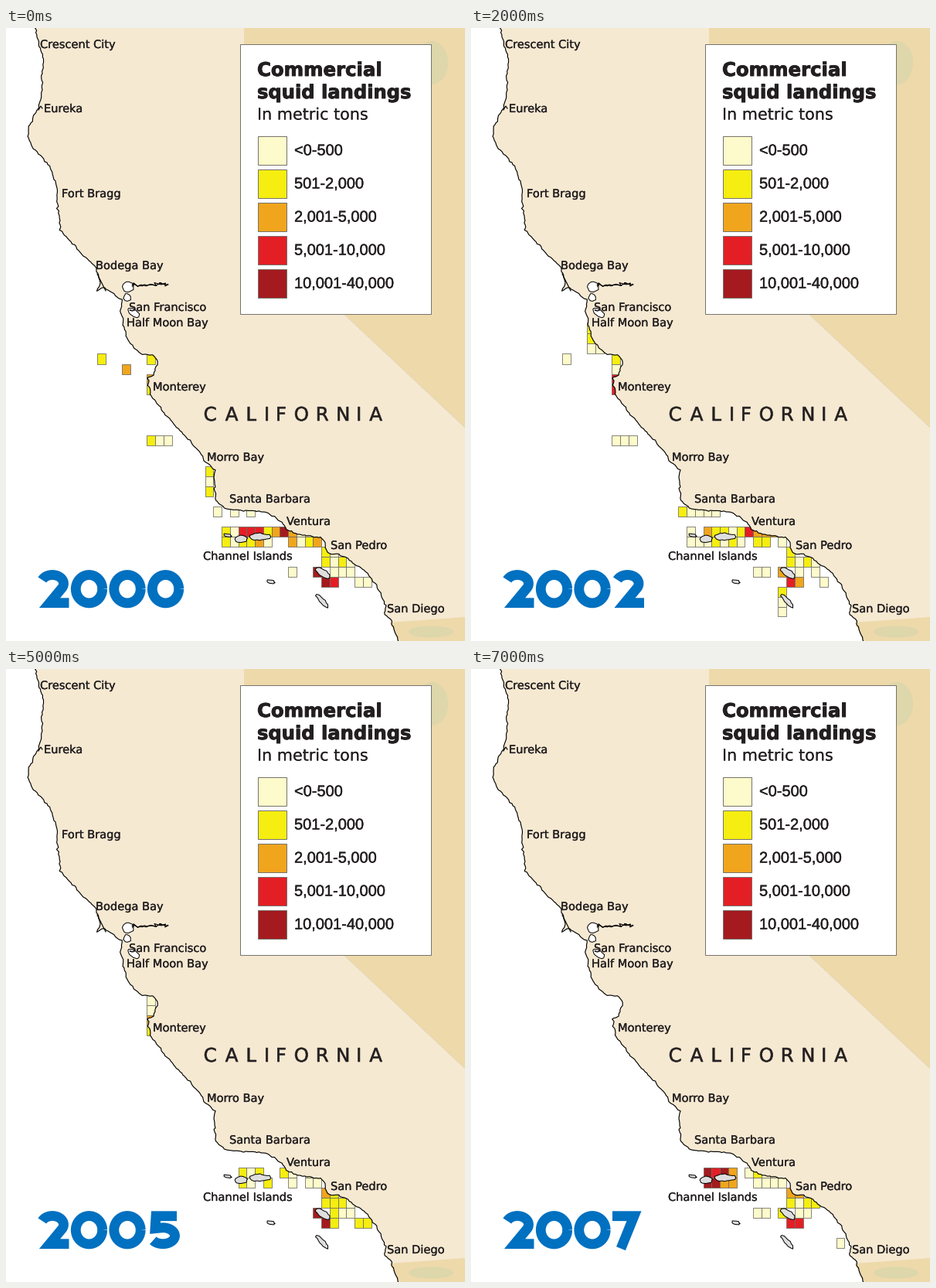
A matplotlib script for the animation above (8000 ms loop, 594x793 px).

```python
import numpy as np
import matplotlib.pyplot as plt
from matplotlib.animation import FuncAnimation
from matplotlib.collections import PatchCollection
from matplotlib.patches import Ellipse, PathPatch, Polygon, Rectangle
from matplotlib.path import Path
from matplotlib.patheffects import withStroke
from matplotlib.textpath import TextPath

W, H = 594, 793
INK, BLUE, GREY = "#231f20", "#0070c0", "#77736c"
LAND, OUTSIDE, GREEN = "#f6e9d2", "#eed9aa", "#ddd7ab"
LEVELS = ["#fdfacb", "#f5ee10", "#f0a51c", "#e41e25", "#a51a1e"]
YEARS = range(2000, 2008)

# one px equals one point
fig = plt.figure(figsize=((W + .001) / 72, (H + .001) / 72), dpi=72, facecolor="white")
ax = fig.add_axes([0, 0, 1, 1])
ax.set(xlim=(0, W), ylim=(H, 0))
ax.axis("off")


def shape(points, z, fill, edge="none", lw=0.0):
    ax.add_patch(Polygon(points, closed=True, facecolor=fill, edgecolor=edge,
                         lw=lw, zorder=z))


def line(points, z, color="black", lw=1.15, **kw):
    ax.plot(*zip(*points), color=color, lw=lw, zorder=z, **kw)


def label(x, y, text, size=14.6, family="DejaVu Sans", weight="normal", bold=.3):
    ax.text(x, y, text, fontsize=size, family=family, weight=weight, color=INK,
            va="baseline", zorder=12,
            path_effects=[withStroke(linewidth=bold, foreground=INK)])


def roughen(points, sigma=.55, step=3, seed=4):
    """Resample a polyline and give it a ragged shore."""
    p = np.array(points, float)
    s = np.r_[0, np.cumsum(np.hypot(*np.diff(p, axis=0).T))]
    t = np.linspace(0, s[-1], int(s[-1] / step))
    q = np.c_[np.interp(t, s, p[:, 0]), np.interp(t, s, p[:, 1])]
    return q + np.random.default_rng(seed).normal(0, sigma, q.shape)


def arc(cx, cy, rx, ry, start, end):
    a = np.radians(np.linspace(start, end, 60))
    return list(zip(cx + rx * np.cos(a), cy + ry * np.sin(a)))


def blob(x, y, w, h, angle, fill):
    """Ragged, tilted ellipse with a black shore."""
    a = np.radians(angle)
    turn = np.array([[np.cos(a), np.sin(a)], [-np.sin(a), np.cos(a)]])
    ring = np.array(arc(0, 0, w / 2, h / 2, 0, 360)) @ turn + [x, y]
    shape(roughen(ring, .5), 6, fill, "black", 1)


# ---- base map ----
shore = [(38, 0), (45, 28), (49, 45), (46, 62), (47, 80), (43, 100), (30, 128),
         (28, 140), (33, 152), (57, 180), (66, 205), (66, 225), (71, 262),
         (93, 287), (116, 309), (122, 331), (117, 340), (126, 335), (150, 352),
         (148, 365), (157, 404), (173, 421), (192, 424), (196, 432), (191, 449),
         (183, 453), (188, 476), (206, 500), (225, 520), (253, 551), (256, 560),
         (270, 571), (269, 585), (272, 612), (284, 622), (335, 626), (358, 640),
         (362, 648), (375, 654), (408, 659), (414, 666), (413, 675), (421, 681),
         (431, 680), (465, 702), (480, 722), (492, 748), (489, 757), (497, 765),
         (508, H)]
coast = roughen(shore)

shape(np.r_[coast, [(W, H), (W, 0)]], 3, LAND)
shape([(308, 0), (W, 0), (W, 517), (308, 249)], 3.1, OUTSIDE)
shape([(497, 769), (W, 762), (W, H), (508, H)], 3.1, OUTSIDE)
ax.add_patch(Ellipse((551, 45), 42, 56, color=GREEN, lw=0, zorder=3.2))
ax.add_patch(Ellipse((550, 781), 58, 15, color=GREEN, lw=0, zorder=3.2))
line([(437, 370), (W, 517)], 3.3, "#c5c3b8", .7, ls=":")
line(coast, 4)

# bay, its eastern arm and the estuaries
for spot in [(158, 335, 14, 13, 0), (157, 348, 9, 11, 0), (165, 368, 18, 8, 40)]:
    blob(*spot, "white")
for seed in (1, 2):
    line(roughen([(163, 333), (182, 333), (209, 331)], 1.3, 2.5, seed), 6)
line([(118, 318), (129, 340)], 5)
line([(42, 106), (45, 101), (47, 104)], 5)

for isle in [(287, 656, 11, 4, 10), (304, 661, 16, 9, 0), (329, 658, 28, 8, 0),
             (410, 705, 22, 8, 36), (409, 741, 24, 5, 50), (343, 716, 11, 5, 10)]:
    blob(*isle, "#dedede")

# ---- labels ----
for x, y, name in [(44, 26, "Crescent City"), (49, 109, "Eureka"),
                   (72, 219, "Fort Bragg"), (116, 312, "Bodega Bay"),
                   (159, 366, "San Francisco"), (156, 386, "Half Moon Bay"),
                   (190, 469, "Monterey"), (260, 560, "Morro Bay"),
                   (289, 614, "Santa Barbara"), (363, 643, "Ventura"),
                   (420, 674, "San Pedro"), (255, 688, "Channel Islands"),
                   (493, 756, "San Diego")]:
    label(x, y, name)

x = 257
for ch in "CALIFORNIA":
    glyph = TextPath((0, 0), ch, size=24.5, prop={"family": "DejaVu Sans"})
    box = glyph.get_extents()
    verts = glyph.vertices * [1, -1] + [x - box.x0, 508]
    ax.add_patch(PathPatch(Path(verts, glyph.codes), facecolor=INK, edgecolor=INK,
                           lw=.6, snap=False, zorder=12))
    x += box.width + 12.5

# ---- legend ----
ax.add_patch(Rectangle((303, 21), 247, 349, facecolor="white", edgecolor=GREY,
                       lw=1, zorder=10))
label(325, 62, "Commercial", 24.4, weight="bold", bold=.9)
label(325, 91, "squid landings", 24.2, weight="bold", bold=.9)
label(325, 118.5, "In metric tons", 20.7, bold=.1)
ranges = ["<0-500", "501-2,000", "2,001-5,000", "5,001-10,000", "10,001-40,000"]
for i, (text, color) in enumerate(zip(ranges, LEVELS)):
    y = 140 + 43 * i
    ax.add_patch(Rectangle((326, y), 37, 37, facecolor=color, edgecolor=GREY,
                           lw=1, zorder=11))
    label(373, y + 24.5, text, 20, "Liberation Sans", bold=.4)

# ---- fishing grounds: column, row, width, height, peak level year by year ----
GROUNDS = [
    (0, -6, 2, 2, "00020000"),   # gulf
    (4, -3, 1, 2, "00230000"),
    (4, -1, 2, 1, "01111000"),
    (1, 0, 1, 1, "22111000"),    # offshore
    (4, 1, 1, 1, "31000000"),
    (7, 0, 1, 2, "22211100"),    # bay
    (7, 2, 1, 2, "34443330"),
    (7, 8, 4, 1, "21111000"),    # central coast
    (14, 11, 1, 3, "20010000"),
    (15, 15, 6, 1, "12222000"),
    (16, 17, 2, 2, "22111000"),  # islands, west to east
    (18, 17, 4, 2, "42334245"),
    (22, 17, 1, 2, "33211000"),
    (23, 17, 1, 1, "54444211"),
    (24, 17, 3, 1, "32330112"),
    (24, 18, 4, 1, "32221111"),
    (28, 19, 2, 1, "21221333"),  # southern bight
    (28, 20, 4, 1, "22220222"),
    (24, 21, 3, 1, "10110011"),
    (27, 21, 1, 1, "54331522"),
    (28, 22, 2, 1, "55422544"),
    (29, 21, 3, 1, "11100221"),
    (32, 22, 2, 1, "12100220"),
    (27, 23, 1, 3, "03210010"),
    (34, 24, 1, 2, "00010001"),
]


def col_x(c):
    return 107.1 + 10.75 * c


def row_y(r):
    # rows shorten slightly towards the south
    return 421.4 + 13.3 * r - .0085 * r * r


def blocks(k):
    """Blocks of one year: each ground thins out at random from its peak."""
    rng = np.random.default_rng(k)
    cells, colors = [], []
    for col, row, w, h, peaks in GROUNDS:
        peak = int(peaks[k])
        for r, c in np.ndindex(h, w):
            drop = int(rng.random() * .8 * (peak + 1)) if r or c else 0
            level = peak - drop
            if level > 0:
                y = row_y(row + r)
                cells.append(Rectangle((col_x(col + c), y), 10.75,
                                       row_y(row + r + 1) - y))
                colors.append(LEVELS[level - 1])
    return ax.add_collection(PatchCollection(
        cells, facecolor=colors, edgecolor="#6d6a62", lw=.8, zorder=2))


# ---- year numerals, built from thick strokes ----
DIGITS = {
    "0": [arc(23.5, 24, 17.2, 18.2, 0, 360)],
    "1": [[(0, 6), (18, 6), (18, 48)]],
    "2": [arc(19.5, 17, 14.5, 11.2, 205, 395) + [(16, 42), (41, 42)]],
    "3": [[(3, 6), (27, 6), (17, 20.5)] + arc(20, 31.3, 15, 11, -90, 145)],
    "4": [[(26, -1), (10, 33), (44, 33)], [(32, 20), (32, 48)]],
    "5": [[(38, 6), (11, 6), (10, 22)] + arc(20, 31.5, 15.5, 10.5, -90, 145)],
    "6": [arc(23, 31.5, 15.5, 11, 0, 360), arc(25, 24, 18, 18.2, 150, 308)],
    "7": [[(0, 6), (28, 6), (11, 48)]],
}


def numerals(year):
    return [ax.add_patch(PathPatch(Path(np.array(pts) + [x, 701.7]), fill=False,
                                   edgecolor=BLUE, lw=12.8, capstyle="butt",
                                   joinstyle="miter", zorder=12))
            for x, ch in zip((40.5, 84, 133.5, 183), str(year))
            for pts in DIGITS[ch]]


scenes = [[blocks(k), *numerals(year)] for k, year in enumerate(YEARS)]


def show(i):
    for k, scene in enumerate(scenes):
        for artist in scene:
            artist.set_visible(k == i)
    return []


anim = FuncAnimation(fig, show, frames=len(YEARS), init_func=lambda: show(0),
                     interval=1000, repeat=True, repeat_delay=0, blit=False)
plt.show()
```
